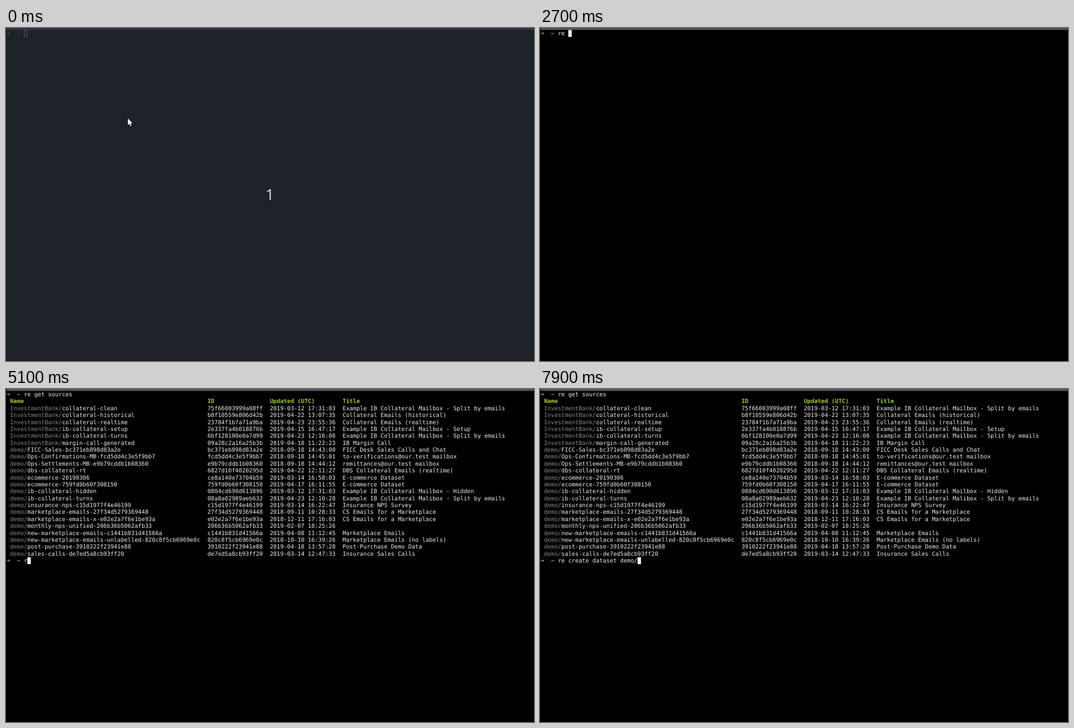
Animation of 942 by 595 pixels, one loop 8 s. Source, as an HTML page with a canvas:

```html
<!DOCTYPE html>
<html lang="en">
<head>
<meta charset="utf-8">
<title>Terminal session</title>
<style>
html, body { margin: 0; width: 100%; height: 100%; overflow: hidden; background: #000; }
canvas { display: block; }
</style>
</head>
<body>
<canvas id="stage" width="942" height="595"></canvas>
<script>
const ctx = document.getElementById('stage').getContext('2d');
const LOOP = 8000;
const CELL = { w: 6.18, h: 12.375, left: 1, top: 3.6, baseline: 9.5 };
const FONT = '10.265px "DejaVu Sans Mono", monospace';
const COLOR = { text: '#eeeeec', dim: '#868686', green: '#a5cb2c', cyan: '#62bfd6', bar: '#555555' };
const COLUMNS = [1, 58, 76, 97];
const PROMPT_COL = 5;

const HEADER = ['Name', 'ID', 'Updated (UTC)', 'Title'];
const SOURCES = `
InvestmentBank/collateral-clean|75f66003999a08ff|2019-03-12 17:31:03|Example IB Collateral Mailbox - Split by emails
InvestmentBank/collateral-historical|b8f10559e806d42b|2019-04-22 13:07:35|Collateral Emails (historical)
InvestmentBank/collateral-realtime|23784f1b7a71a9ba|2019-04-23 23:55:36|Collateral Emails (realtime)
InvestmentBank/ib-collateral-setup|2e337fa4b018876b|2019-04-15 16:47:17|Example IB Collateral Mailbox - Setup
InvestmentBank/ib-collateral-turns|6bf128100e0a7d99|2019-04-23 12:16:08|Example IB Collateral Mailbox - Split by emails
InvestmentBank/margin-call-generated|09a28c2a16a25b3b|2019-04-18 11:22:23|IB Margin Call
demo/FICC-Sales-bc371eb898d83a2e|bc371eb898d83a2e|2018-09-18 14:43:00|FICC Desk Sales Calls and Chat
demo/Ops-Confirmations-MB-fcd5dd4c3e5f9bb7|fcd5dd4c3e5f9bb7|2018-09-18 14:45:01|to-verifications@our.test mailbox
demo/Ops-Settlements-MB-e9b79cddb1b08360|e9b79cddb1b08360|2018-09-18 14:44:12|remittances@our.test mailbox
demo/dbs-collateral-rt|6827d10f4020295d|2019-04-22 12:11:27|DBS Collateral Emails (realtime)
demo/ecommerce-20190306|ce8a140e73704b59|2019-03-14 16:58:03|E-commerce Dataset
demo/ecommerce-759fd0b60f308150|759fd0b60f308150|2019-04-17 16:11:55|E-commerce Dataset
demo/ib-collateral-hidden|0804cd690d613896|2019-03-12 17:31:03|Example IB Collateral Mailbox - Hidden
demo/ib-collateral-turns|08a8a02989aeb632|2019-04-23 12:10:28|Example IB Collateral Malibox - Split by emails
demo/insurance-nps-c15d1977f4e46199|c15d1977f4e46199|2019-03-14 16:22:47|Insurance NPS Survey
demo/marketplace-emails-27f34d5279369448|27f34d5279369448|2018-09-11 10:28:33|CS Emails for a Marketplace
demo/marketplace-emails-x-e02e2a7f6e1be93a|e02e2a7f6e1be93a|2018-12-11 17:16:03|CS Emails for a Marketplace
demo/monthly-nps-unified-206b36b5062afb33|206b36b5062afb33|2019-02-07 18:25:26|
demo/new-marketplace-emails-c1441b831d41566a|c1441b831d41566a|2019-04-08 11:12:45|Marketplace Emails
demo/new-marketplace-emails-unlabelled-820c8f5cb6969e0c|820c8f5cb6969e0c|2018-10-10 16:39:26|Marketplace Emails (no labels)
demo/post-purchase-3910222f23941e88|3910222f23941e88|2019-04-18 13:57:28|Post-Purchase Demo Data
demo/sales-calls-de7ed5a8cb93ff20|de7ed5a8cb93ff20|2019-03-14 12:47:33|Insurance Sales Calls
`.trim().split('\n').map(line => line.split('|'));

// Each burst starts at a time and adds the given key groups 100 ms apart.
const FIRST = [[1300, ['r', 'e']], [2700, [' ', 'g', 'e', 't ']], [3200, ['so']],
  [3400, ['u', 'r', 'c', 'e', 's']]];
const SECOND = [[5100, ['r', 'e', ' ']], [5800, ['c']], [6000, ['re']],
  [6200, ['a', 't', 'e ', 'd', 'at', 'a']], [6900, ['s', 'e', 't ']],
  [7300, ['d', 'e', 'm', 'o']], [7900, ['/']]];

const typed = (bursts, t) => bursts.map(([start, keys]) =>
  keys.filter((_, i) => t >= start + i * 100).join('')).join('');
const cellX = col => CELL.left + col * CELL.w;
const cellY = row => CELL.top + row * CELL.h;

function put(text, col, row, color = COLOR.text, bold = false) {
  ctx.font = (bold ? 'bold ' : '') + FONT;
  ctx.fillStyle = color;
  ctx.fillText(text, cellX(col), cellY(row) + CELL.baseline);
}

function drawPrompt(row, command) {
  put('➜', 0, row, COLOR.green, true);
  put('~', 3, row, COLOR.cyan, true);
  put(command, PROMPT_COL, row);
}

function drawCursor(col, row, hollow = false) {
  if (hollow) {
    ctx.strokeStyle = COLOR.text;
    ctx.lineWidth = 1;
    ctx.strokeRect(Math.round(cellX(col)) + 0.5, Math.round(cellY(row)) - 0.5, 5, 12);
  } else {
    ctx.fillStyle = COLOR.text;
    ctx.fillRect(cellX(col), cellY(row), CELL.w, CELL.h);
  }
}

function drawTable() {
  HEADER.forEach((label, i) => put(label, COLUMNS[i], 1, COLOR.green, true));
  SOURCES.forEach(([name, ...rest], i) => {
    const row = i + 2;
    const split = name.indexOf('/') + 1;
    put(name.slice(0, split), COLUMNS[0], row, COLOR.dim);
    put(name.slice(split), COLUMNS[0] + split, row);
    rest.forEach((value, j) => put(value, COLUMNS[j + 1], row));
  });
}

function drawPointer(x, y) {
  const outline = [[0, 0], [0, 12.4], [2.9, 9.9], [4.9, 14.4], [6.9, 13.5], [5, 9.2], [8.8, 9]];
  ctx.beginPath();
  outline.forEach(([dx, dy]) => ctx.lineTo(x + dx, y + dy));
  ctx.closePath();
  ctx.lineJoin = 'round';
  ctx.lineWidth = 2;
  ctx.strokeStyle = '#000';
  ctx.stroke();
  ctx.fillStyle = '#f2f2f2';
  ctx.fill();
}

function drawCountdown() {
  ctx.fillStyle = 'rgba(41, 45, 54, 0.75)';
  ctx.fillRect(0, 0, 942, 595);
  ctx.font = '26.67px "Noto Sans", sans-serif';
  ctx.fillStyle = '#d3dae3';
  ctx.textAlign = 'center';
  ctx.fillText('1', 470.5, 307);
  ctx.textAlign = 'left';
}

function draw(t) {
  ctx.textRendering = 'geometricPrecision';
  ctx.fillStyle = '#000';
  ctx.fillRect(0, 0, 942, 595);
  ctx.fillStyle = COLOR.bar;
  ctx.fillRect(1, 0, 941, 3.5);

  const first = typed(FIRST, t);
  drawPrompt(0, first);
  if (t < 4000) {
    drawCursor(PROMPT_COL + first.length, 0, t < 1300);
  } else if (t < 4100) {
    drawCursor(0, 1);
  } else {
    const row = SOURCES.length + 2;
    const second = typed(SECOND, t);
    drawTable();
    drawPrompt(row, second);
    drawCursor(PROMPT_COL + second.length, row);
  }

  if (t < 500) drawCountdown();
  if (t < 2000) drawPointer(t < 1900 ? 217.3 : 237.3, 161.3);
}

const start = performance.now();
function tick() {
  draw((performance.now() - start) % LOOP);
  requestAnimationFrame(tick);
}
tick();
</script>
</body>
</html>
```
